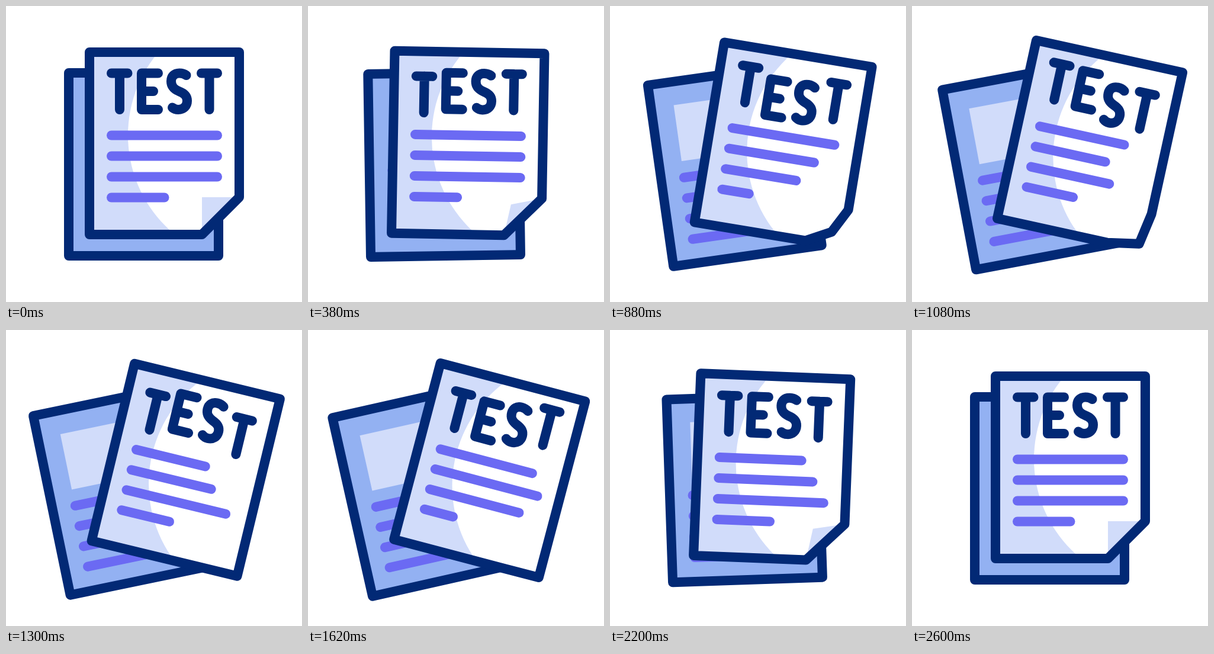
An HTML page with a canvas for the animation above (3000 ms loop, 500 px wide and 500 px high).

```html
<!DOCTYPE html>
<html lang="en">
<head>
<meta charset="utf-8">
<title>Test papers</title>
<style>
  html, body { margin: 0; width: 100%; height: 100%; overflow: hidden; background: #fff; }
  canvas { display: block; width: 500px; height: 500px; }
</style>
</head>
<body>
<canvas id="stage" role="img" aria-label="TEST"></canvas>
<script>
const LOOP = 3000;
const NAVY = '#022975', VIOLET = '#6b6af3', PALE = '#d1dcfa', BLUE = '#93b1f2';

const canvas = document.getElementById('stage');
const ctx = canvas.getContext('2d');
const dpr = window.devicePixelRatio || 1;
canvas.width = canvas.height = 500 * dpr;

// Steps of [time, value], eased between neighbours
const TILT = [[200, 0], [1280, 13.6], [1600, 14.8], [2400, 0]];
const BOUNCE = [[0, 0], [400, 15], [800, -7], [1200, 8], [1600, 0]];
const SHRINK = [[0, 0], [520, 59], [1000, 0], [1400, 40], [1800, 0]];

const LETTERS = [
  'M178 113.5H205.5M192 113.5V175',
  'M257 113.5H229V175H257M229 144H249',
  'M304.5 117C301 114.5 297 113.5 293 113.5C284 113.5 279 119 279 127' +
    'C279 137 285 141 292 144C300 147 306 151 306 160C306 169 300 175 291 175C287 175 284 174 281 171.5',
  'M330 113.5H357M343.5 113.5V175'
].map(d => new Path2D(d));

const ROWS = [[218.5, 179], [253.5, 179], [288.5, 179], [323.5, 89.5]];
const BACK_ROWS = [276, 311, 346, 381];

const clamp = p => Math.min(1, Math.max(0, p));
const smooth = p => p * p * (3 - 2 * p);

function track(steps, t) {
  if (t <= steps[0][0]) return steps[0][1];
  for (let i = 1; i < steps.length; i++) {
    const [t0, a] = steps[i - 1], [t1, b] = steps[i];
    if (t < t1) return a + (b - a) * smooth((t - t0) / (t1 - t0));
  }
  return steps[steps.length - 1][1];
}

function polygon(points) {
  const path = new Path2D();
  points.forEach(([x, y]) => path.lineTo(x, y));
  path.closePath();
  return path;
}

function fill(path, color) {
  ctx.fillStyle = color;
  ctx.fill(path);
}

function stroke(path, color) {
  ctx.strokeStyle = color;
  ctx.stroke(path);
}

function row(x, y, length) {
  stroke(new Path2D(`M${x} ${y}h${length}`), VIOLET);
}

function rotated(x, y, degrees, paint) {
  ctx.save();
  ctx.translate(x, y);
  ctx.rotate(degrees * Math.PI / 180);
  ctx.translate(-x, -y);
  paint();
  ctx.restore();
}

function backPage() {
  const page = polygon([[106, 113], [359, 113], [359, 422], [106, 422]]);
  fill(page, BLUE);
  ctx.fillStyle = PALE;
  ctx.fillRect(144.5, 152.5, 176, 95.5);
  BACK_ROWS.forEach(y => row(144.5, y, 176));
  stroke(page, NAVY);
}

function frontPage(t) {
  // The folded corner opens along the diagonal; past halfway it widens the page
  const open = t < 1600 ? clamp((t - 200) / 1040) : 1 - smooth(clamp((t - 1600) / 800));
  const corner = k => [331 + 63 * k, 323 + 63 * k];
  const foldA = [394, 323], foldB = [331, 386];
  const page = polygon([[141, 78], [394, 78], foldA, corner(Math.max(open, 0.5)), foldB, [141, 386]]);

  fill(page, PALE);
  ctx.save();
  ctx.clip(page);
  const light = new Path2D();
  light.arc(423, 218.4, 217, 0, 2 * Math.PI);
  fill(light, '#fff');
  ctx.restore();
  if (open < 0.5) fill(polygon([corner(open), foldA, foldB]), PALE);
  stroke(page, NAVY);

  ROWS.forEach(([y, length], i) => {
    row(178, y, length - track(SHRINK, t - 800 + 200 * i));
  });
  LETTERS.forEach((letter, i) => {
    ctx.save();
    ctx.translate(0, track(BOUNCE, t - 200 - 200 * i));
    stroke(letter, NAVY);
    ctx.restore();
  });
}

function draw(t) {
  const tilt = track(TILT, t);
  ctx.setTransform(dpr, 0, 0, dpr, 0, 0);
  ctx.fillStyle = '#fff';
  ctx.fillRect(0, 0, 500, 500);
  ctx.lineWidth = 16;
  ctx.lineCap = ctx.lineJoin = 'round';
  rotated(232.5, 422, -tilt * 0.858, backPage);
  rotated(267.5, 386, tilt, () => frontPage(t));
}

const start = performance.now();
function tick() {
  draw((performance.now() - start) % LOOP);
  requestAnimationFrame(tick);
}
tick();
</script>
</body>
</html>
```
